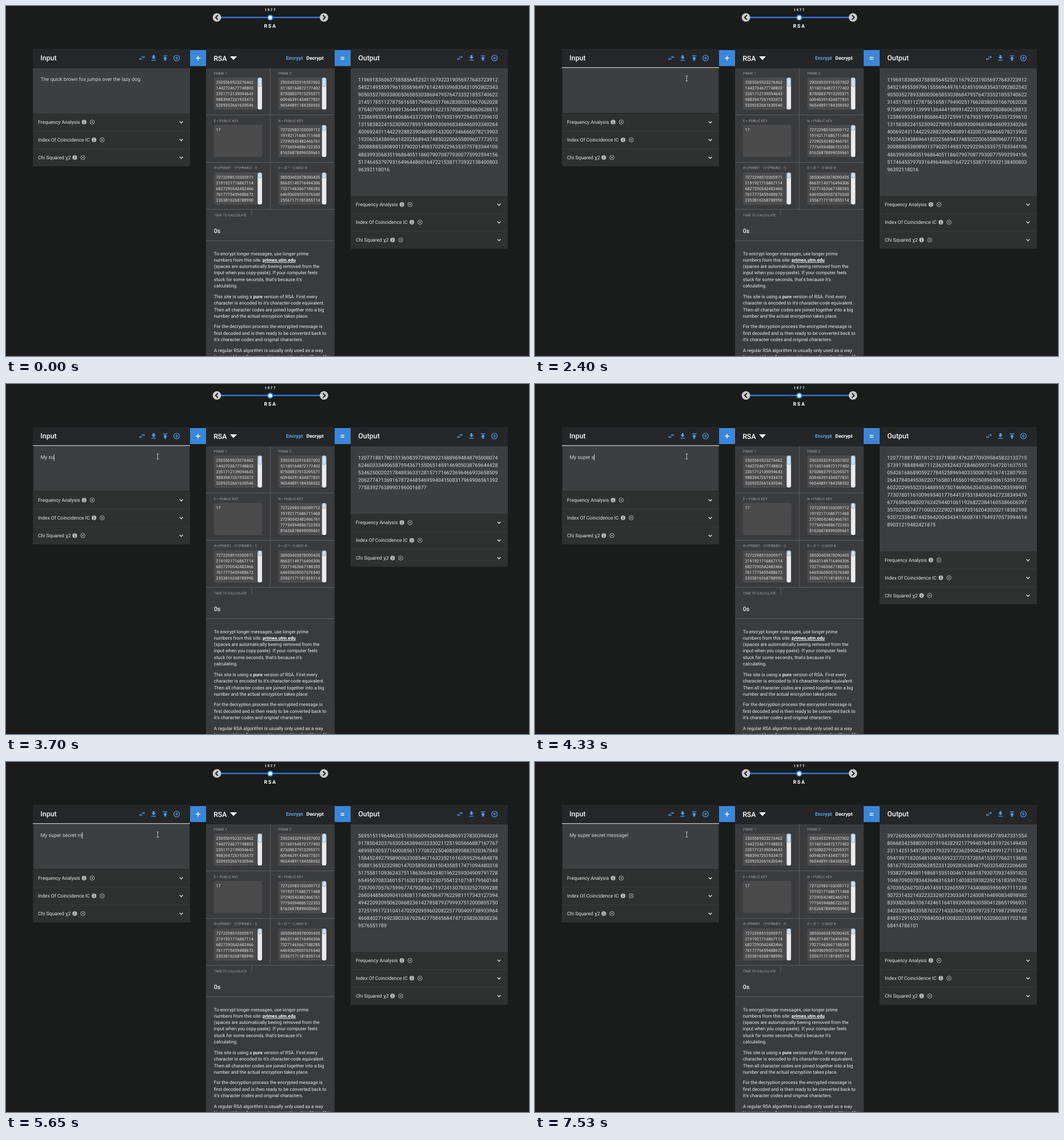
Recreate the animation shown at these times as an HTML page. Size 915 by 612 pixels, loop 7990 ms.

```html
<!DOCTYPE html>
<html lang="en">
<head>
<meta charset="utf-8">
<title>RSA</title>
<style>
  html, body { margin: 0; width: 100%; height: 100%; overflow: hidden; background: #1a1b1b; }
  svg { display: block; width: 915px; height: 612px; }
  text { font-family: Roboto, sans-serif; white-space: pre; text-rendering: geometricPrecision; }
</style>
</head>
<body>
<svg id="stage" viewBox="0 0 915 612" xmlns="http://www.w3.org/2000/svg"></svg>
<script>
const LOOP = 7990;
const LINE = 13.1;
const BLUE = '#4b9cf0';
const MESSAGE = 'My super secret message!';
const PANGRAM = 'The quick brown fox jumps over the lazy dog.';

// Pointer travel, click, select all, delete, first and last keystroke
const MOVE = 520, FOCUS = 1700, SELECT = 1770, CLEAR = 1840, FIRST_KEY = 2860, LAST_KEY = 6980;
// Typing pace: time and characters typed, even in between
const PACE = [[FIRST_KEY, 1], [3240, 2], [3700, 5], [3930, 6], [4330, 10], [5260, 15], [6420, 22], [LAST_KEY, 24]];

function randomDigits(count, seed) {
  let out = '';
  while (out.length < count) {
    seed = (seed * 16807) % 2147483647;
    out += Math.floor(seed / 2147483647 * 10);
  }
  return out;
}

// RSA key: the visible start of each 300-digit factor, the rest is seeded
const factor = (head, seed) => BigInt(head + randomDigits(300 - head.length, seed));
const E = 17n;
const P = factor('25055695232764621442724677748803235171213909464398839472619334735209252661630546', 1977);
const Q = factor('2902453291655700251160164872177402875088379132955716094639143487783196544891184358552', 4057);
const N = P * Q;
const PHI = (P - 1n) * (Q - 1n);
const D = (9n * PHI + 1n) / E;

const wrap = (number, columns, rows = Infinity) =>
  String(number).match(new RegExp(`.{1,${columns}}`, 'g')).slice(0, rows);

function encrypt(message) {
  const codes = [...message].map(c => c.charCodeAt(0)).join('');
  return wrap(BigInt(codes) ** E % N, 49);
}

const rect = (x, y, w, h, fill, more = '') =>
  `<rect x="${x}" y="${y}" width="${w}" height="${h}" fill="${fill}" ${more}/>`;
// Text placed by the middle of its capitals
const label = (x, y, size, content, fill = '#e6e6e6', more = '') =>
  `<text x="${x}" y="${(y + size * .356).toFixed(2)}" font-size="${size}" fill="${fill}" ${more}>${content}</text>`;
const stroke = (d, color, width = 1) =>
  `<path d="${d}" fill="none" stroke="${color}" stroke-width="${width}"/>`;
const icon = (x, y, d) =>
  `<path transform="translate(${x} ${y}) scale(.56) translate(-12 -12)" d="${d}" fill="${BLUE}"/>`;
const MEDIUM = 'font-weight="500"';
const BOLD = 'font-weight="700"';
const CENTER = 'text-anchor="middle"';

function panelHeader(x, title) {
  const tools = x + 191;
  return rect(x, 75, 275, 34, '#252627') + label(x + 13.3, 91, 12.4, title, '#f4f4f4', MEDIUM)
    + icon(tools, 91, 'M21 9l-4-4v3h-7v2h7v3zM7 11l-4 4 4 4v-3h7v-2H7z')
    + icon(tools + 20.3, 91, 'M5 20h14v-2H5v2zM19 9h-4V3H9v6H5l7 7 7-7z')
    + icon(tools + 40.5, 91, 'M5 4v2h14V4H5zm0 10h4v6h6v-6h4l-7-7-7 7z')
    + `<circle cx="${tools + 60.5}" cy="91" r="5" fill="none" stroke="${BLUE}" stroke-width="1.2"/>`
    + stroke(`M${tools + 57.7} 91h5.6m-2.8 -2.8v5.6`, BLUE, 1.2);
}

function statRow(x, y, name, iconX) {
  return label(x + 9, y, 8.55, name)
    + `<circle cx="${x + iconX}" cy="${y}" r="4.1" fill="#b9b9b9"/>`
    + stroke(`M${x + iconX} ${y - 2.3}v1.2m0 1v2.6`, '#2f3030', 1.1)
    + `<circle cx="${x + iconX + 14.2}" cy="${y}" r="3.8" fill="none" stroke="#b9b9b9" stroke-width=".9"/>`
    + stroke(`M${x + iconX + 12.7} ${y - 1.5}l3 3m0 -3l-3 3`, '#c4c4c4', .9)
    + stroke(`M${x + 256.8} ${y - 1.3}l2.8 2.8l2.8 -2.8`, '#e6e6e6', 1.3);
}

function statRows(x) {
  return rect(x, 188, 275, 92.3, '#2f3030')
    + rect(x, 218.4, 275, .8, '#3d3e3e') + rect(x, 249.3, 275, .8, '#3d3e3e')
    + statRow(x, 203, 'Frequency Analysis', 89.6)
    + statRow(x, 234, 'Index Of Coincidence IC', 107)
    + statRow(x, 265, 'Chi Squared χ2', 73.3);
}

function numberBox(x, y, lines, thumb) {
  const clip = `clip${x}-${y}`;
  const digits = lines.map((line, i) => label(x + 3.6, y + 8.3 + i * 10.05, 7.29, line, '#dedede')).join('');
  const bar = thumb
    ? rect(x + 76.5, y + .3, 7.6, 55.6, '#ececec', 'rx="3"')
      + rect(x + 77, y + .7, 6.6, thumb, '#d3e1ec', 'rx="3" stroke="#7fa9c9" stroke-width=".9"')
    : '';
  return `<clipPath id="${clip}">${rect(x, y, 84.5, 56, '#fff')}</clipPath>`
    + rect(x, y, 84.5, 56, '#4b4b4c', 'rx="2.5"') + `<g clip-path="url(#${clip})">${digits}</g>` + bar;
}

function keyPanel() {
  const small = (x, y, s) => label(x, y, 6.1, s, '#a3a3a4');
  const italic = s => `<tspan font-style="italic">${s}</tspan>`;
  const line = '#5d5d5f', left = 363.8, right = 476.3;
  return rect(350, 109, 225, 503, '#3a3b3d')
    + [190, 273, 355, 410].map(y => rect(350, y, 225, 1, line)).join('')
    + rect(461.8, 109, 1, 246, line) + rect(429.3, 355, 1, 13.5, line)
    + small(left, 118, 'PRIME 1') + small(right, 118, 'PRIME 2')
    + small(left, 200.5, 'E = PUBLIC KEY') + small(right, 200.5, 'N = PUBLIC KEY')
    + small(left, 282.7, italic('Φ=(PRIME1 - 1)*(PRIME2 - 1)'))
    + small(right, 282.7, 'D = ' + italic('(E ^ −1) MOD Φ'))
    + small(left, 365.5, 'TIME TO CALCULATE')
    + numberBox(left, 125, wrap(P, 16, 6), 15) + numberBox(right, 125, wrap(Q, 17, 6), 15)
    + numberBox(left, 208, wrap(E, 16), 0) + numberBox(right, 208, wrap(N, 17, 6), 9)
    + numberBox(left, 291, wrap(PHI, 16, 6), 9) + numberBox(right, 291, wrap(D, 17, 6), 9)
    + label(left, 393.5, 10.6, '0s', '#f2f2f2', MEDIUM);
}

function explanation() {
  const bold = (s, more = '') => `<tspan ${BOLD} ${more}>${s}</tspan>`;
  const paragraphs = [
    [433, ['To encrypt longer messages, use longer prime',
      'numbers from this site: ' + bold('primes.utm.edu', 'text-decoration="underline" fill="#fff"'),
      '(spaces are automatically beeing removed from the',
      'input when you copy-paste). If your computer feels',
      'stuck for some seconds, that\'s because it\'s', 'calculating.']],
    [508.4, ['This site is using a ' + bold('pure') + ' version of RSA. First every',
      'character is encoded to it\'s character-code equivalent.',
      'Then all character codes are joined together into a big',
      'number and the actual encryption takes place.']],
    [560.6, ['For the decryption process the encrypted message is',
      'first decoded and is then ready to be converted back to',
      'it\'s character codes and original characters.']],
    [602.4, ['A regular RSA algorithm is usually only used as a way',
      'to encrypt keys for symmetric encryption algorithms, like']]
  ];
  return paragraphs.map(([y, lines]) =>
    lines.map((s, i) => label(363.8, y + i * 11.2, 8.1, s, '#ececec')).join('')).join('');
}

function timeline() {
  const button = (x, dir) => `<circle cx="${x}" cy="20" r="7.4" fill="#cbcbcb"/>`
    + stroke(`M${x - dir * 1.8} 16l${dir * 4} 4l${-dir * 4} 4`, '#1d1e1e', 1.9);
  return rect(372, 18.8, 182, 2.4, '#2e7de0') + button(369, -1) + button(556.3, 1)
    + '<circle cx="462.3" cy="20.3" r="4.4" fill="#f1f6fc" stroke="#2e7de0" stroke-width="2"/>'
    + label(462.6, 6.7, 6.4, '1977', '#f0f0f0', `${CENTER} ${BOLD} letter-spacing="1.4"`)
    + label(462.6, 35, 8.8, 'RSA', '#fff', `${CENTER} ${BOLD} letter-spacing="1.8"`);
}

const operator = (x, d) => rect(x, 77, 28, 28, '#3a86d8') + stroke(d, '#fff', 1.4);

const stage = document.getElementById('stage');
stage.innerHTML = timeline()
  + panelHeader(47, 'Input') + panelHeader(603, 'Output') + rect(350, 75, 225, 34, '#242526')
  + label(363.2, 91.3, 12.3, 'RSA', '#fff', MEDIUM) + '<path d="M392 88h12l-6 6.5z" fill="#fff"/>'
  + label(490, 91.3, 8.6, 'Encrypt', '#58a6f5', BOLD) + label(525.6, 91.3, 8.6, 'Decrypt', '#fff', BOLD)
  + operator(322, 'M332 91.3h8m-4 -4v8') + operator(575, 'M585.4 89.8h6.4m-6.4 3.2h6.4')
  + keyPanel() + explanation()
  + rect(47, 109, 275, 79, '#3d3e40') + statRows(47)
  + '<g id="focus">' + rect(47.5, 108.5, 274, 79, 'none', 'stroke="#222324"')
  + rect(47, 107.2, 275, 1.1, '#ececec') + '</g>'
  + rect(60, 122.6, 0, 11.6, '#2f6fc0', 'id="selection"')
  + label(60.4, 128.3, 8.85, '', '#d6d6d6', 'id="typed"')
  + rect(60, 123, .9, 11, '#f0f0f0', 'id="caret"')
  + rect(603, 109, 275, 79, '#3d3e40', 'id="outputBody"')
  + '<g id="outputText"></g>'
  + `<g id="outputRows">${statRows(603)}</g>`
  + '<path id="arrow" d="M0 0v11l2.6 -2.4l1.8 4l1.7 -.8l-1.8 -3.8h3.5z" fill="#fff" stroke="#111" stroke-width=".6"/>'
  + '<path id="beam" d="M-2 -4.5h4M0 -4.5v9M-2 4.5h4" fill="none" stroke="#c8c8c8" stroke-width=".9"/>';

const part = id => document.getElementById(id);
const show = (id, on) => part(id).setAttribute('visibility', on ? 'visible' : 'hidden');
const set = (id, name, value) => part(id).setAttribute(name, value);

let shownOutput = null;
function drawOutput(message) {
  if (message === shownOutput) return;
  shownOutput = message;
  const lines = encrypt(message);
  const grow = (Math.max(lines.length, 2) - 2) * LINE;
  part('outputText').innerHTML =
    lines.map((s, i) => label(616, 128.4 + i * LINE, 8.88, s, '#dcdcdc')).join('');
  set('outputBody', 'height', 79 + grow);
  set('outputRows', 'transform', `translate(0 ${grow.toFixed(1)})`);
}

function drawPointer(t) {
  const k = Math.min(10, Math.floor((t - MOVE) / 87)) / 10;
  const u = k * k * (3 - 2 * k);
  const bezier = (a, b, c) => a * (1 - u) ** 2 + 2 * b * u * (1 - u) + c * u * u;
  const x = bezier(802, 400, 265.4), y = bezier(586, 5, 126.7);
  const overInput = x < 322 && y > 109;
  show('arrow', t >= MOVE && !overInput);
  show('beam', t >= MOVE && overInput);
  for (const id of ['arrow', 'beam']) set(id, 'transform', `translate(${x.toFixed(1)} ${y.toFixed(1)})`);
}

function typedCount(t) {
  const next = PACE.findIndex(([at]) => at > t);
  if (next < 0) return MESSAGE.length;
  if (next === 0) return 0;
  const [t0, n0] = PACE[next - 1], [t1, n1] = PACE[next];
  return Math.floor(n0 + (n1 - n0) * (t - t0) / (t1 - t0));
}

function draw(t) {
  const text = t < CLEAR ? PANGRAM : MESSAGE.slice(0, typedCount(t));
  const selected = t >= SELECT && t < CLEAR;
  const within = (from, to) => t >= from && t < to;

  part('typed').textContent = text;
  const width = text ? part('typed').getComputedTextLength() : 0;
  set('caret', 'x', (60.2 + width).toFixed(1));
  set('selection', 'width', width.toFixed(1));
  show('selection', selected);
  show('focus', t >= FOCUS);
  show('caret', within(FOCUS, SELECT) || within(CLEAR, CLEAR + 550) || within(FIRST_KEY, LAST_KEY + 550));
  drawOutput(text || PANGRAM);
  drawPointer(t);
}

const start = performance.now();
function frame() {
  draw((performance.now() - start) % LOOP);
  requestAnimationFrame(frame);
}
frame();
</script>
</body>
</html>
```
